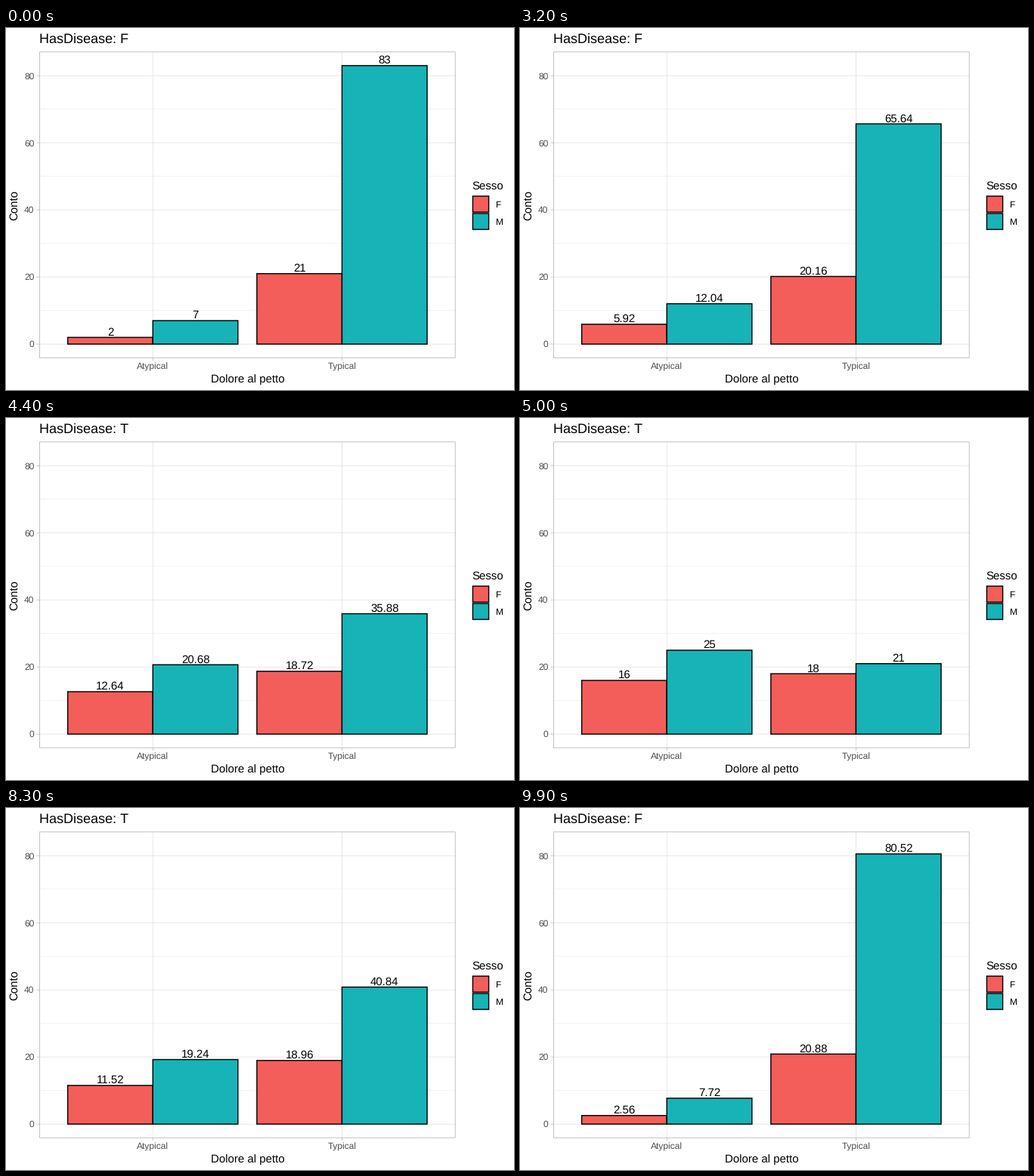
Animation, 672 px wide and 480 px high, one loop 10 s. Source, as a matplotlib script:

```python
import matplotlib.pyplot as plt
from matplotlib.animation import FuncAnimation
from matplotlib.patches import Rectangle

W, H, DPI = 672, 480, 96
PX = 72 / DPI                      # points per pixel
STEPS, FRAMES, INTERVAL = 25, 100, 100

RED, TEAL = "#F35E5A", "#17B3B7"
GRID, BORDER, TICK_TEXT = "#DEDEDE", "#B3B3B3", "#4D4D4D"

LEFT, RIGHT, TOP, BOTTOM = 44.1, 594.6, 31.4, 437.6
X_UNIT = (RIGHT - LEFT) / 2.2
Y_UNIT = (BOTTOM - TOP) / (83 * 1.1)
Y_ZERO = BOTTOM - 83 * 0.05 * Y_UNIT
BAR_W = 0.45 * X_UNIT

# (category, side, colour, count without disease, count with disease)
BARS = [
    (1, -1, RED, 2, 16),
    (2, -1, RED, 21, 18),
    (1, 0, TEAL, 7, 25),
    (2, 0, TEAL, 83, 21),
]

plt.rcParams["font.family"] = "Liberation Sans"
plt.rcParams["text.hinting"] = "none"
plt.rcParams["text.hinting_factor"] = 1

fig = plt.figure(figsize=(W / DPI, H / DPI), dpi=DPI, facecolor="white")
ax = fig.add_axes([0, 0, 1, 1])
ax.set_xlim(0, W)
ax.set_ylim(H, 0)
ax.axis("off")


def x_pos(cat):
    return LEFT + (cat - 0.4) * X_UNIT


def y_pos(value):
    return Y_ZERO - value * Y_UNIT


def line(x0, y0, x1, y1, color, width, z):
    ax.plot([x0, x1], [y0, y1], color=color, lw=width * PX, zorder=z,
            solid_capstyle="butt", snap=False)


def box(x, y, w, h, fill, edge="black", width=1.42, z=3):
    rect = Rectangle((x, y), w, h, facecolor=fill, edgecolor=edge,
                     lw=width * PX, joinstyle="miter", zorder=z, snap=False)
    return ax.add_patch(rect)


def label(x, y, text, size=11, color="black", ha="left", **kw):
    return ax.text(x, y, text, fontsize=size, color=color, ha=ha,
                   va="baseline", zorder=6, **kw)


def draw_axes():
    for v in (10, 30, 50, 70):
        line(LEFT, y_pos(v), RIGHT, y_pos(v), GRID, 0.36, 1)
    for v in range(0, 81, 20):
        y = y_pos(v)
        line(LEFT, y, RIGHT, y, GRID, 0.71, 1)
        line(LEFT - 3.67, y, LEFT, y, BORDER, 0.71, 1)
        label(37.5, y + 4.2, str(v), 8.8, TICK_TEXT, "right")
    for cat, name in ((1, "Atypical"), (2, "Typical")):
        x = x_pos(cat)
        line(x, TOP, x, BOTTOM, GRID, 0.71, 1)
        line(x, BOTTOM, x, BOTTOM + 3.67, BORDER, 0.71, 1)
        label(x, 453, name, 8.8, TICK_TEXT, "center")
    box(LEFT + 0.36, TOP + 0.36, RIGHT - LEFT - 0.72, BOTTOM - TOP - 0.72,
        "none", BORDER, 0.8, 5)
    label((LEFT + RIGHT) / 2, 470, "Dolore al petto", ha="center")
    ax.text(18, (TOP + BOTTOM) / 2, "Conto", fontsize=11, rotation=90,
            ha="right", va="center", zorder=6)


def draw_legend():
    label(616.5, 214, "Sesso")
    for y, name, color in ((222, "F", RED), (245, "M", TEAL)):
        box(617.45, y + 0.95, 21.15, 21.15, color)
        label(646.9, y + 15.8, name, 8.8)


draw_axes()
draw_legend()
title = label(LEFT, 20, "", 13.2)
rects, counts = [], []
for cat, side, color, *_ in BARS:
    x = x_pos(cat) + side * BAR_W
    rects.append(box(x, Y_ZERO, BAR_W, 0, color))
    counts.append(label(x + BAR_W / 2, Y_ZERO, "", ha="center"))


def progress(k):
    """Share of the way from F to T: hold, rise, hold, fall."""
    if k <= 50:
        return max(0, k - 25) / STEPS
    return 1 - max(0, k - 75) / STEPS


def update(k):
    t = progress(k)
    title.set_text("HasDisease: " + ("T" if t > 0.5 else "F"))
    for (_, _, _, start, end), rect, count in zip(BARS, rects, counts):
        value = start + (end - start) * t
        y = y_pos(value)
        rect.set_y(y)
        rect.set_height(Y_ZERO - y)
        count.set_text(f"{round(value, 2):g}")
        count.set_y(y - 2.6)
    return [title, *rects, *counts]


anim = FuncAnimation(fig, update, frames=FRAMES, interval=INTERVAL,
                     init_func=lambda: update(0), repeat=True,
                     repeat_delay=0, blit=False)
plt.show()
```
